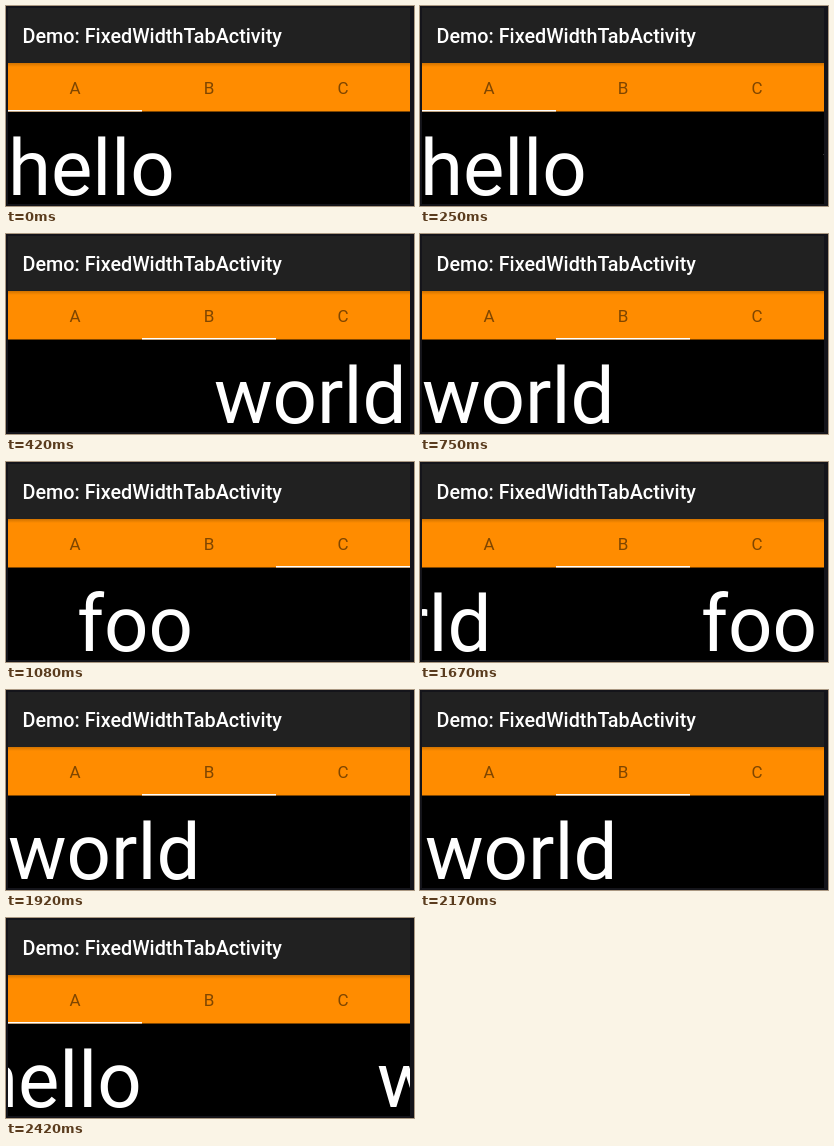
Recreate the animation shown at these times as an HTML page. Size 408 by 200 pixels, loop 2510 ms.

```html
<!DOCTYPE html>
<html lang="en">
<head>
<meta charset="utf-8">
<title>Fixed width tabs</title>
<style>
  html, body { margin: 0; width: 100%; height: 100%; overflow: hidden; background: #14141a; }
  svg { display: block; font-family: Roboto, sans-serif; }
  .title { font-size: 19.8px; font-weight: 500; fill: #fff; }
  .tabs { font-size: 17px; text-anchor: middle; fill: #7f4600; }
  .pages { font-size: 78px; fill: #fff; }
</style>
</head>
<body>
<svg width="408" height="200">
  <defs>
    <linearGradient id="shade" x2="0" y2="1">
      <stop stop-opacity=".18"/>
      <stop offset="1" stop-opacity="0"/>
    </linearGradient>
  </defs>
  <rect x="2" y="2" width="402" height="55" fill="#212121"/>
  <text class="title" x="16.5" y="37">Demo: FixedWidthTabActivity</text>
  <svg x="2" y="105" width="402" height="93">
    <rect width="402" height="93"/>
    <g id="pages" class="pages">
      <text x="0" y="83.5">hello</text>
      <text x="402" y="83.5">world</text>
      <text x="804" y="83.5">foo</text>
    </g>
  </svg>
  <rect x="2" y="57" width="402" height="48.5" fill="#ff8c00"/>
  <rect x="2" y="57" width="402" height="4" fill="url(#shade)"/>
  <g class="tabs">
    <text x="69" y="88">A</text>
    <text x="203" y="88">B</text>
    <text x="337" y="88">C</text>
  </g>
  <rect id="bar" x="2" y="104" width="134" height="1.5" fill="#fff"/>
</svg>
<script>
const LOOP = 2510, STEP = 1000 / 12, STEPS = 30;
const PAGE = 402, TAB = 134;
const DRAG = 170, SETTLE = 300, DRAGGED = 0.3;
const bar = document.getElementById('bar');
const pages = document.getElementById('pages');

// The finger lets go at `release`; the tab is selected at that moment.
const swipes = [
  { release: 398.5, from: 0, to: 1 },
  { release: 1010, from: 1, to: 2 },
  { release: 1621, from: 2, to: 1 },
  { release: 2312, from: 1, to: 0 }
];

const clamp = v => Math.min(1, Math.max(0, v));

function progress(t) {
  if (t < 0) return DRAGGED * clamp(1 + t / DRAG) ** 2;
  return 1 - (1 - DRAGGED) * (1 - clamp(t / SETTLE)) ** 5;
}

function draw(now) {
  const step = Math.min(STEPS - 1, Math.floor((now % LOOP + 5) / STEP));
  const t = step * STEP;
  let position = 0, tab = 0;
  for (const { release, from, to } of swipes) {
    position += (to - from) * progress(t - release);
    if (t >= release) tab = to;
  }
  pages.setAttribute('transform', `translate(${-Math.round(position * PAGE)})`);
  bar.setAttribute('x', 2 + tab * TAB);
}

let start;
function tick(now) {
  start ??= now;
  draw(now - start);
  requestAnimationFrame(tick);
}
draw(0);
requestAnimationFrame(tick);
</script>
</body>
</html>
```
